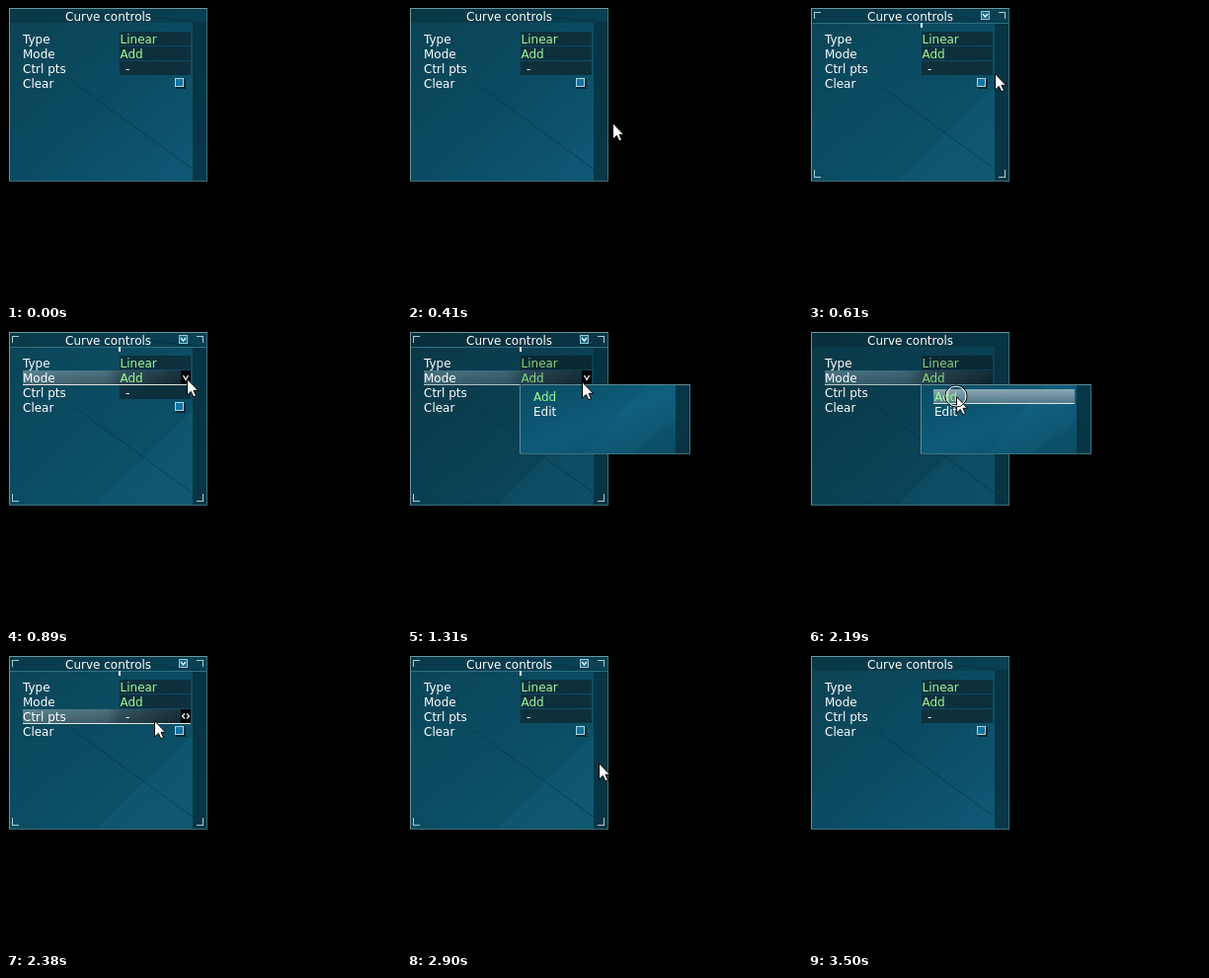
An HTML page that plays this animation: 400 px wide and 300 px high, repeating every 4760 ms.

```html
<!DOCTYPE html>
<html lang="en">
<head>
<meta charset="utf-8">
<title>Curve controls</title>
<style>
  html, body { margin: 0; width: 100%; height: 100%; overflow: hidden; background: #000; }
  svg { display: block; width: 400px; height: 300px; }
  text { font: 12px "DejaVu Sans", sans-serif; fill: #fff; white-space: pre; }
  .val { fill: #9cfb94; }
  .dim .val { fill: #82d67c; }
  .field { fill: #0e303d; }
  .dim .field { fill: #0b2833; }
  .line { fill: none; stroke: #a9ccd3; }
  rect, .line { shape-rendering: crispEdges; }
</style>
</head>
<body>
<svg viewBox="0 0 400 300">
  <defs>
    <linearGradient id="idle" x1="0" y1="0" x2="1" y2="1">
      <stop offset="0" stop-color="#0b4353"/><stop offset=".5" stop-color="#0b4b62"/><stop offset="1" stop-color="#0f5a78"/>
    </linearGradient>
    <linearGradient id="focus" x1="0" y1="0" x2="1" y2="1">
      <stop offset="0" stop-color="#0b4558"/><stop offset=".6" stop-color="#0b4e65"/><stop offset="1" stop-color="#0e566f"/>
    </linearGradient>
    <linearGradient id="dimmed" x1="0" y1="0" x2="1" y2="1">
      <stop offset="0" stop-color="#0a3846"/><stop offset=".5" stop-color="#0a4053"/><stop offset="1" stop-color="#0c4b63"/>
    </linearGradient>
    <linearGradient id="menuBg" x1="0" y1="0" x2="1" y2="1">
      <stop offset="0" stop-color="#0b4c63"/><stop offset=".5" stop-color="#0d5b79"/><stop offset="1" stop-color="#0b4a61"/>
    </linearGradient>
    <linearGradient id="glow">
      <stop offset="0" stop-color="#5b8593"/><stop offset=".5" stop-color="#4b7280"/><stop offset=".58" stop-color="#365663"/><stop offset="1" stop-color="#142e39"/>
    </linearGradient>
    <linearGradient id="shade" x2="0" y2="1">
      <stop offset="0" stop-opacity="0"/><stop offset="1" stop-opacity=".22"/>
    </linearGradient>
    <linearGradient id="pick" x2="0" y2="1">
      <stop offset="0" stop-color="#8ca8b3"/><stop offset="1" stop-color="#50788a"/>
    </linearGradient>
  </defs>

  <g id="panel">
    <rect id="bg" x="3" y="2" width="201" height="176"/>
    <path id="facet" d="M90 178L189 82V178Z" fill="#2a86a4" opacity=".09"/>
    <path d="M68 77L190 166" stroke="#04313f" stroke-opacity=".55" fill="none"/>
    <rect x="3" y="2" width="201" height="15" opacity=".16"/>
    <path d="M140 11L204 17" stroke="#062c39" stroke-opacity=".5" fill="none"/>
    <rect x="189" y="17" width="15" height="161" fill="#07303e" opacity=".82"/>
    <path class="line" d="M3.500 178V2.500H204" style="stroke:#6d949a"/>
    <path class="line" d="M3 177.500H203.500V3" style="stroke:#3f6b79"/>
    <g id="fields"></g>
    <g id="hover">
      <rect x="17" width="170" height="14" fill="url(#glow)"/>
      <rect x="17" width="170" height="14" fill="url(#shade)"/>
      <rect id="rule" x="17" y="14" width="170" height="1" fill="#e4e6e2"/>
    </g>
    <g id="labels"></g>
    <g id="check">
      <rect x="172" y="74" width="10" height="10" fill="#052833"/>
      <rect x="171" y="73" width="9" height="9" fill="#a5d8e8"/>
      <rect x="172" y="74" width="7" height="7" fill="#1673a0"/>
    </g>
    <g id="button">
      <rect x="177" width="10" height="14"/>
      <path id="mark" fill="none" stroke="#fff" stroke-width="1.2"/>
    </g>
    <text x="60" y="15">Curve controls</text>
    <g id="decor">
      <rect x="4" y="17" width="199" height="1" fill="#2d7085"/>
      <rect x="114" y="17" width="2" height="5" fill="#fff"/>
      <path class="line" d="M6.500 13V6.500H13M193 6.500H199.500V13M6.500 166V173.500H13M193 173.500H199.500V166"/>
      <rect x="175" y="5" width="9" height="9" fill="#8fc6d6"/>
      <rect x="176" y="6" width="7" height="7" fill="#176a84"/>
      <path d="M177 8L179.500 11L182 8" fill="none" stroke="#fff" stroke-width="1.200"/>
    </g>
  </g>

  <g id="menu">
    <rect x="114" y="55" width="173" height="71" fill="url(#menuBg)"/>
    <path d="M180 126L240 56H272V90L225 126Z" fill="#2b8cac" opacity=".08"/>
    <rect x="272" y="56" width="15" height="70" fill="#07303e" opacity=".82"/>
    <path class="line" d="M114.500 126V55.500H287" style="stroke:#5f8b96"/>
    <path class="line" d="M114 125.500H286.500V56" style="stroke:#3f7182"/>
    <g id="pickRow">
      <rect x="127" y="60" width="143" height="14" fill="url(#pick)"/>
      <rect x="127" y="74" width="143" height="1" fill="#e4e6e2"/>
    </g>
    <text class="val" x="128" y="72">Add</text>
    <text x="128" y="87">Edit</text>
  </g>

  <g id="cursor">
    <path d="M.5 .8V17L4.300 13.400L6.900 18.800L9.500 17.600L7 12.300H11.600Z" fill="#fff" stroke="#000"/>
    <g id="ring" fill="none">
      <circle r="11" stroke="#000"/><circle r="10" stroke="#fff"/>
    </g>
  </g>
</svg>
<script>
const LOOP = 4760;
const $ = id => document.getElementById(id);
const show = (id, on) => { $(id).style.display = on ? '' : 'none'; };
const between = (v, a, b) => v >= a && v < b;

const rows = [
  { label: 'Type', value: 'Linear', mark: 'v' },
  { label: 'Mode', value: 'Add', mark: 'v' },
  { label: 'Ctrl pts', value: '-', mark: '<>' },
  { label: 'Clear' }
];
const marks = { 'v': 'M179.500 5L182 9.500L184.500 5', '<>': 'M181 4.500L178.500 7L181 9.500M183 4.500L185.500 7L183 9.500' };
const rowTop = i => 26 + 15 * i;

rows.forEach((row, i) => {
  const base = rowTop(i) + 12;
  $('labels').innerHTML += `<text x="17" y="${base}">${row.label}</text>`;
  if (!row.value) return;
  $('fields').innerHTML += `<rect class="field" x="115" y="${rowTop(i)}" width="72" height="14"/>`;
  const plain = row.value === '-';
  $('labels').innerHTML += `<text x="${plain ? 121 : 115.500}" y="${base}" class="${plain ? '' : 'val'}">${row.value}</text>`;
});

// Pointer moves: first step, last step, number of steps, end point, easing power
const start = [304, 322];
const moves = [
  [230, 410, 5, 208, 118, 1],
  [470, 740, 7, 183, 50, 1.6],
  [890, 890, 1, 183, 49, 1],
  [1310, 1590, 7, 150, 67, 1.4],
  [2710, 2900, 5, 194, 110, 1],
  [2940, 3220, 7, 285, 220, 1.2],
  [3280, 3500, 6, 322, 302, 1]
];

function pointer(t) {
  let [x, y] = start;
  for (const [from, to, steps, ex, ey, power] of moves) {
    if (t < from) break;
    const gap = (to - from) / (steps - 1 || 1);
    const done = t >= to ? steps : Math.floor((t - from) / gap) + 1;
    const k = 1 - (1 - done / steps) ** power;
    x += (ex - x) * k;
    y += (ey - y) * k;
  }
  return [Math.round(x), Math.round(y)];
}

function render(t) {
  const [x, y] = pointer(t);
  const open = between(t, 1120, 2380);
  const onMenu = open && between(x, 114, 287) && between(y, 55, 126);
  const focus = !onMenu && between(x, 3, 204) && between(y, 2, 178);
  const over = focus && between(x, 17, 188) ? Math.floor((y - 26) / 15) : -1;
  const row = open ? 1 : over;
  const hot = row >= 0 && row < rows.length;
  const mark = hot && !onMenu && rows[row].mark;

  $('panel').setAttribute('class', open ? 'dim' : '');
  $('bg').setAttribute('fill', `url(#${open ? 'dimmed' : focus ? 'focus' : 'idle'})`);
  show('facet', focus || open);
  show('decor', focus);
  show('hover', hot);
  show('button', mark);
  if (hot) {
    const shift = `translate(0 ${rowTop(row)})`;
    $('hover').setAttribute('transform', shift);
    $('hover').setAttribute('opacity', open ? .8 : 1);
    $('button').setAttribute('transform', shift);
  }
  if (mark) $('mark').setAttribute('d', marks[mark]);

  show('menu', open);
  show('pickRow', onMenu && between(x, 127, 270) && y < 90);
  $('pickRow').setAttribute('transform', `translate(0 ${y < 75 ? 0 : 15})`);
  show('cursor', t >= 230 && t < 3500);
  $('cursor').setAttribute('transform', `translate(${x} ${y})`);
  show('ring', between(t, 1030, 1120) || between(t, 2190, 2380));
}

const begin = performance.now();
function tick() {
  render((performance.now() - begin) % LOOP);
  requestAnimationFrame(tick);
}
tick();
</script>
</body>
</html>
```
